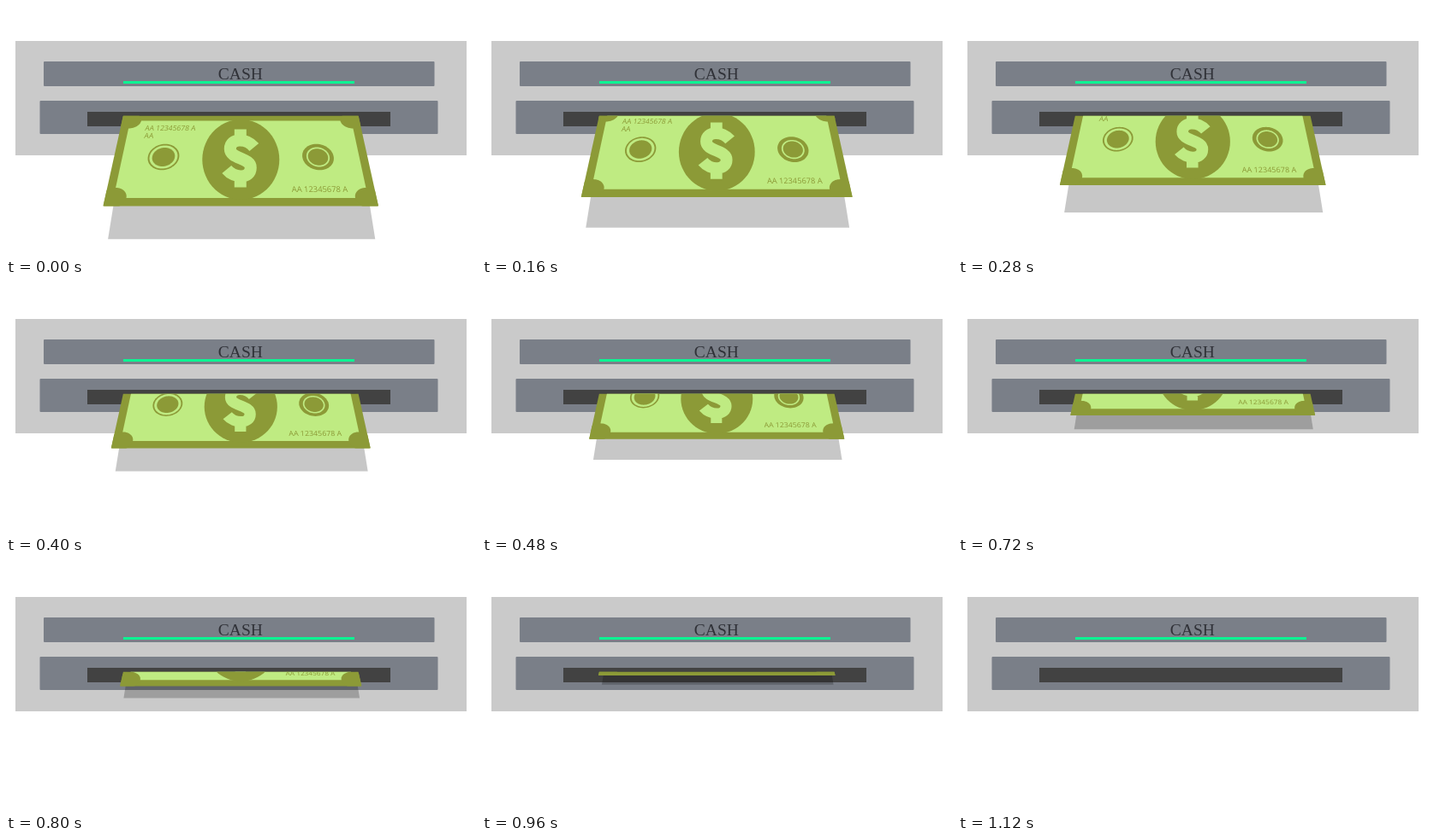
These frames come from a looping animation (549 by 293 pixels, 1.24 s). An HTML page with a canvas:

```html
<!DOCTYPE html>
<html lang="en">
<head>
<meta charset="utf-8">
<title>Cash slot</title>
<style>
  html, body { margin: 0; width: 100%; height: 100%; overflow: hidden; background: #fff; }
  canvas { display: block; }
</style>
</head>
<body>
<canvas id="stage" width="549" height="293"></canvas>
<script>
const ctx = document.getElementById('stage').getContext('2d');
const LOOP = 1240, STEP = 40, LAST = 1120;
const OLIVE = '#8c9a37', LIME = '#bfeb82', SLATE = '#7a7f88';
const SLOT = 128.7, MID = 274.3, HORIZON = -492, DEPTH = 620, BOTTOM = 234.5;
const DOLLAR = new Path2D(
  'M16-13C7-24-12-24-12-11C-12 1 12-1 12 11C12 24-7 24-16 13M0-34V-20M0 20V34');

// Lower edge of the note: time, height, speed in px per ms
const KEYS = [
  [0, BOTTOM, -.03], [160, 224, -.095], [280, 210, -.135], [400, 192.5, -.142],
  [600, 167.5, -.117], [800, 145.5, -.1], [LAST, SLOT, 0]
];

function edgeAt(t) {
  const i = Math.min(KEYS.findLastIndex(k => k[0] <= t), KEYS.length - 2);
  const [t0, a, va] = KEYS[i], [t1, b, vb] = KEYS[i + 1];
  const h = t1 - t0, p = (t - t0) / h, q = 1 - p;
  return a * (1 + 2 * p) * q * q + b * (3 - 2 * p) * p * p
    + h * (va * p * q * q - vb * p * p * q);
}

function box(x, y, w, h, color, radius = 0) {
  ctx.fillStyle = color;
  ctx.beginPath();
  ctx.roundRect(x, y, w, h, radius);
  ctx.fill();
}

function shape(points, color) {
  ctx.beginPath();
  points.forEach(([x, y]) => ctx.lineTo(x, y));
  ctx.closePath();
  ctx.fillStyle = color;
  ctx.fill();
}

function drawMachine() {
  box(11, 41, 527, 134, '#cacaca');
  box(44, 65, 456.5, 29, SLATE, 1);
  box(39.5, 111, 465, 39, SLATE, 1);
  box(95, 124, 354, 17, '#424242');
  ctx.fillStyle = '#303238';
  ctx.font = '19.5px "Liberation Serif", serif';
  ctx.textAlign = 'center';
  ctx.fillText('CASH', 273.8, 85.5);
  box(137, 88, 270, 3, '#0cf593');
}

function drawShadow(edge) {
  const y = 159.5 + 1.278 * (edge - 145.5);
  const left = v => 137.5 - .161 * (v - 159);
  const right = v => 413 + .16 * (v - 159);
  shape([[left(SLOT), SLOT], [right(SLOT), SLOT], [right(y), y], [left(y), y]], 'rgba(0,0,0,.22)');
}

// The note is laid out fully extended, then slid back along its tilted plane.
function drawNote(edge) {
  const shift = DEPTH / (edge - HORIZON) - DEPTH / (BOTTOM - HORIZON);
  const project = ([x, y]) => {
    const scale = 1 / (1 + shift * (y - HORIZON) / DEPTH);
    return [MID + (x - MID) * scale, HORIZON + (y - HORIZON) * scale, scale];
  };
  // Lean towards the vanishing point
  const lean = (x, y) => (x - MID) / (y - HORIZON);

  const oval = (cx, cy, rx, ry, color) => {
    const points = Array.from({ length: 60 }, (_, i) => {
      const a = i * Math.PI / 30, dy = ry * Math.sin(a);
      return project([cx + rx * Math.cos(a) + lean(cx, cy) * dy, cy + dy]);
    });
    shape(points, color);
  };
  const place = (x, y, paint) => {
    const [px, py, scale] = project([x, y]), tall = scale * scale;
    ctx.save();
    ctx.transform(scale, 0, lean(x, y) * tall, tall, px, py);
    paint();
    ctx.restore();
  };
  const label = (text, x, y, size) => place(x, y, () => {
    ctx.font = size + 'px "Open Sans", sans-serif';
    ctx.textAlign = 'left';
    ctx.fillStyle = OLIVE;
    ctx.fillText(text, 0, 0);
  });

  ctx.save();
  ctx.beginPath();
  ctx.rect(0, SLOT, 549, 293 - SLOT);
  ctx.clip();
  shape([[137, 128], [411.5, 128], [435, BOTTOM], [113.5, BOTTOM]].map(project), OLIVE);
  ctx.clip();

  const corners = [[145, 134.5], [403.5, 134.5], [423, 225], [125.5, 225]];
  shape(corners.map(project), LIME);
  corners.forEach(([x, y]) => y < 180 ? oval(x, y, 13, 9, OLIVE) : oval(x, y, 15, 12, OLIVE));

  oval(MID, 180, 45, 47, OLIVE);
  place(MID - .5, 178.5, () => {
    ctx.strokeStyle = LIME;
    ctx.lineWidth = 14;
    ctx.stroke(DOLLAR);
  });

  oval(184, 177, 18.3, 15.3, OLIVE);
  oval(184, 177, 16.4, 13.6, LIME);
  oval(184, 177, 13.2, 11, OLIVE);
  oval(364.5, 177, 18.3, 15.3, OLIVE);
  oval(364.5, 177, 13.5, 11.5, LIME);
  oval(364.5, 177, 11.7, 9.8, OLIVE);

  label('AA 12345678 A', 162, 146, 8.45);
  label('AA', 161, 155, 8.6);
  label('AA 12345678 A', 334, 218.2, 9.4);
  ctx.restore();
}

function draw(now) {
  const t = Math.min(Math.floor(now % LOOP / STEP) * STEP, LAST);
  const edge = edgeAt(t);
  ctx.clearRect(0, 0, 549, 293);
  drawMachine();
  if (edge > SLOT) {
    drawShadow(edge);
    drawNote(edge);
  }
}

const start = performance.now();
function tick() {
  draw(performance.now() - start);
  requestAnimationFrame(tick);
}
tick();
</script>
</body>
</html>
```
